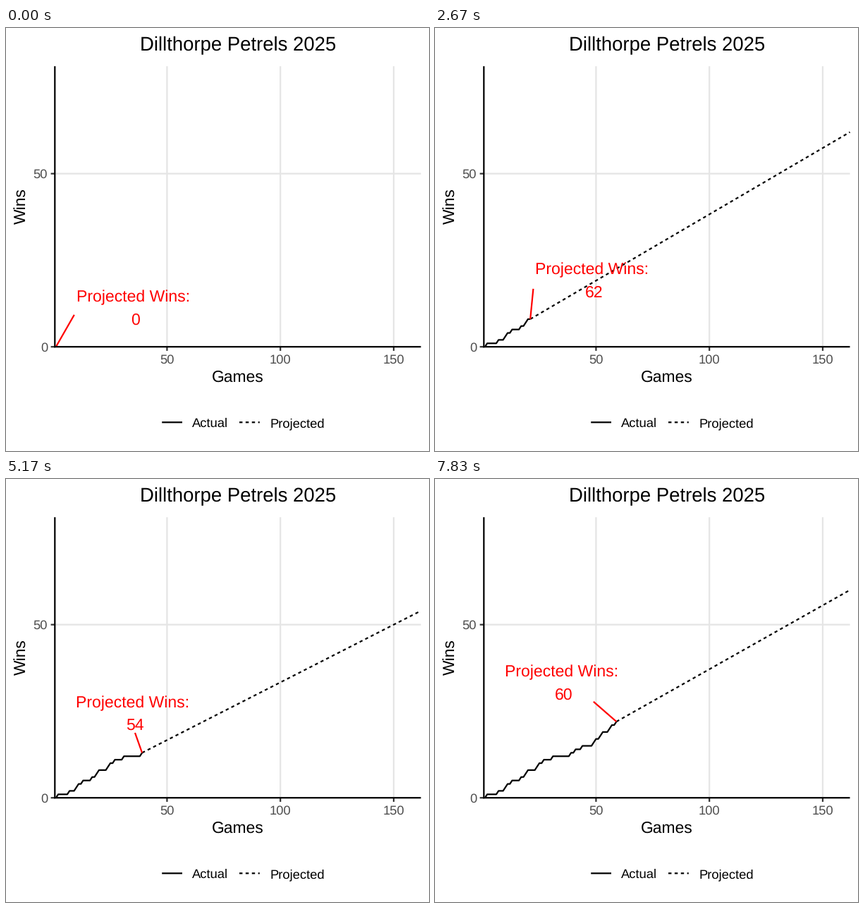
These frames come from a looping animation (600 by 600 pixels, 8000 ms). A matplotlib script:

```python
import numpy as np
import matplotlib.pyplot as plt
from matplotlib.animation import FuncAnimation
from matplotlib.patches import Rectangle

plt.rcParams["font.family"] = "Liberation Sans"
plt.rcParams["text.hinting"] = "none"

LOOP_MS, TICK_MS = 8000, 20
STEPS = 48
LAST_GAME = 59
SEASON = 162
WON = [2, 7, 10, 11, 13, 17, 19, 20, 24, 25, 27, 31, 39, 41, 44,
       49, 50, 52, 53, 56, 57, 59]

GRID, TICK, TICK_TEXT = "#E5E5E5", "#333333", "#4D4D4D"
RED = "#FF0000"
PX = 0.72                      # points per pixel at 100 dpi
LW = 2.22 * PX
DASH = (0, (2, 2))
LEFT, RIGHT, TOP, BOTTOM = 69.3, 588.54, 54.2, 452.2
BASE, SMALL, BIG = 22.92, 18.33, 27.5

games = np.arange(1, LAST_GAME + 1)
wins = np.array([sum(w <= g for w in WON) for g in games])


def to_x(game):
    return RIGHT - (SEASON - game) * 3.2155


def to_y(win):
    return BOTTOM - 4.912 * win


fig = plt.figure(figsize=(6, 6), dpi=100, facecolor="white")
ax = fig.add_axes([0, 0, 1, 1])
ax.set_xlim(0, 600)
ax.set_ylim(600, 0)
ax.axis("off")


def line(xs, ys, color="black", z=2, **kw):
    return ax.plot(xs, ys, color=color, lw=LW, zorder=z, snap=False,
                   solid_capstyle="butt", dash_capstyle="butt", **kw)[0]


def text(x, y, s, size, color="black", ha="center", **kw):
    return ax.text(x, y, s, fontsize=size * PX, color=color, ha=ha,
                   va="baseline", zorder=6, **kw)


# Panel, axes and ticks
for g in (50, 100, 150):
    x = to_x(g)
    line([x, x], [TOP, BOTTOM], GRID, 1)
    line([x, x], [BOTTOM, BOTTOM + 5.7], TICK, 4)
    text(x, 476, str(g), SMALL, TICK_TEXT)
line([LEFT, RIGHT], [to_y(50)] * 2, GRID, 1)
for w in (0, 50):
    y = to_y(w)
    line([LEFT - 5.7, LEFT], [y, y], TICK, 4)
    text(59, y + 6.5, str(w), SMALL, TICK_TEXT, "right")
line([LEFT, LEFT], [TOP, BOTTOM + 1], z=5)
line([LEFT - 1, RIGHT], [BOTTOM, BOTTOM], z=5)

# Titles and legend
MID = (LEFT + RIGHT) / 2
text(MID, 32.2, "Dillthorpe Petrels 2025", BIG)
text(MID, 502.2, "Games", BASE)
text(27.5, 252.2, "Wins", BASE, rotation=90, rotation_mode="anchor")
line([221.2, 250], [559.3, 559.3])
line([331, 359.8], [559.3, 559.3], ls=DASH)
text(264.3, 566.2, "Actual", SMALL, ha="left")
text(374.2, 566.2, "Projected", SMALL, ha="left")

# Moving parts
panel = Rectangle((LEFT, TOP), RIGHT - LEFT, BOTTOM - TOP,
                  transform=ax.transData)
actual = line([], [])
projected = line([], [], ls=DASH)
pointer = line([], [], RED, 3)
for part in (actual, projected, pointer):
    part.set_clip_path(panel)
caption = text(0, 0, "Projected Wins:", 23, RED, "left")
number = text(0, 0, "", 23, RED)

HALF_W, HALF_H = 83.7, 27.7


def label_left(game):
    """Left edge of the label: beside the line early on, then pinned."""
    if game > 31:
        return 99.3
    return np.interp(game, [1, 6, 12, 21, 31],
                     [99.8, 100, 119.4, 142.4, 157.3])


def pointer_end(px, py, left):
    cx, cy = left + HALF_W, py - 56
    if px < left:
        gap = left - 3 - px
        return left - 3, cy + np.interp(gap, [9, 27], [13, 10.5])
    dx = px - cx
    return cx + np.sign(dx) * max(abs(dx) - 32.5, 0), cy + HALF_H


def draw(i):
    # Each step starts on the tick nearest its ideal time.
    step = (i * TICK_MS + 14) * STEPS // LOOP_MS
    game = round(1 + min(step, STEPS - 1) * (LAST_GAME - 1) / (STEPS - 1))
    win = wins[game - 1]
    total = round(win / game * SEASON)
    px, py = to_x(game), to_y(win)
    actual.set_data(to_x(games[:game]), to_y(wins[:game]))
    projected.set_data([px, to_x(SEASON)], [py, to_y(total)])
    projected.set_visible(total > 0)

    left = label_left(game)
    ex, ey = pointer_end(px, py, left)
    pointer.set_data([ex, px], [ey, py])
    caption.set_position((left, py - 64))
    number.set_position((left + HALF_W, py - 31.6))
    number.set_text(str(total))
    return actual, projected, pointer, caption, number


anim = FuncAnimation(fig, draw, frames=LOOP_MS // TICK_MS, interval=TICK_MS,
                     init_func=lambda: draw(0), repeat=True, repeat_delay=0)
plt.show()
```
